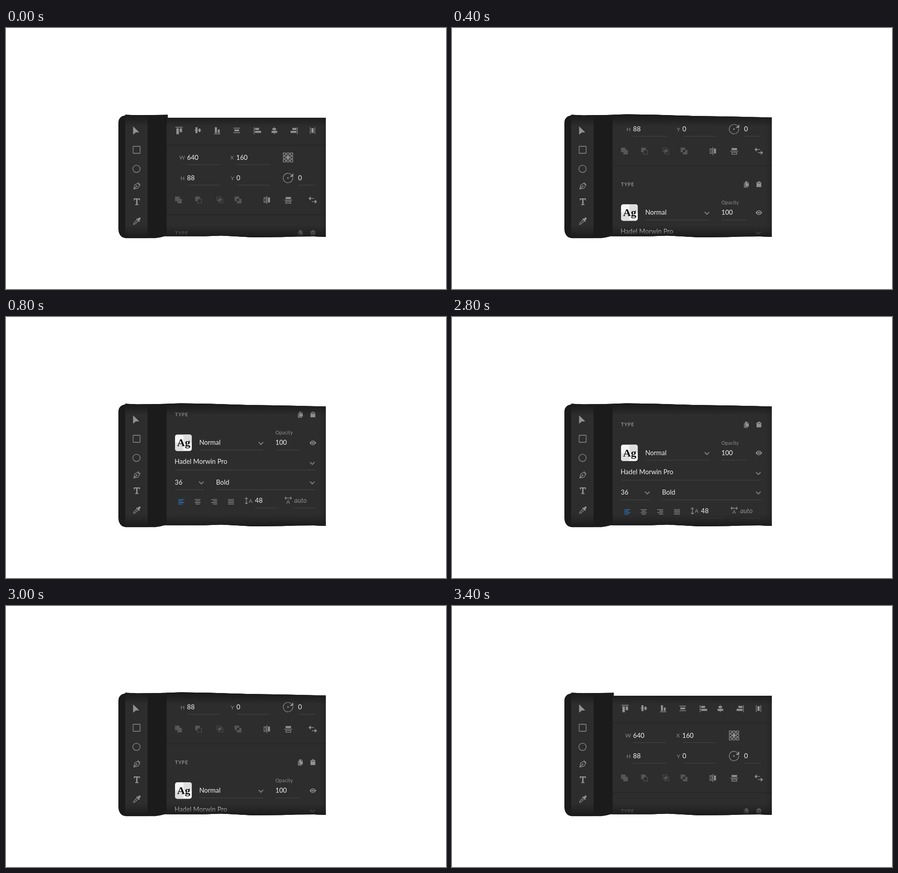
An HTML page for the animation above (5400 ms loop, 971 px wide and 576 px high).

```html
<!DOCTYPE html>
<html lang="en">
<head>
<meta charset="utf-8">
<title>Properties panel</title>
<style>
html, body { margin: 0; width: 100%; height: 100%; overflow: hidden; background: #fff; }
svg { display: block; width: 971px; height: 576px; }
text { font: 14.5px Lato, sans-serif; fill: #f0f0f0; }
.label { font-size: 12px; fill: #8c8c8c; }
.small { font-size: 11.2px; fill: #8c8c8c; }
.title { font-size: 10.6px; font-weight: bold; letter-spacing: .8px; fill: #909090; }
.serif { font: bold 24px "Liberation Serif", serif; fill: #111; }
.fill { fill: #919191; }
.line { fill: none; stroke: #919191; stroke-width: 1.3; }
.dim { fill: #565656; }
.dimline { fill: #2d2d2d; stroke: #565656; }
.rule { fill: none; stroke: #474747; }
.divider { stroke: #262626; stroke-width: 1.5; }
.chevron { fill: none; stroke: #7d7d7d; stroke-width: 2.2; }
</style>
</head>
<body>
<svg viewBox="0 0 971 576">
<defs>
  <clipPath id="shape"><path id="outline"/></clipPath>
  <clipPath id="tile"><rect x="373" y="259" width="37" height="36.5" rx="5"/></clipPath>
  <linearGradient id="fadeTop" x2="0" y2="1">
    <stop stop-color="#1b1b1b"/><stop offset=".3" stop-color="#1b1b1b" stop-opacity=".75"/>
    <stop offset="1" stop-color="#1b1b1b" stop-opacity="0"/>
  </linearGradient>
  <linearGradient id="fadeBottom" x2="0" y2="1">
    <stop stop-color="#1b1b1b" stop-opacity="0"/><stop offset=".5" stop-color="#1b1b1b" stop-opacity=".4"/>
    <stop offset="1" stop-color="#1b1b1b"/>
  </linearGradient>
  <linearGradient id="fadeRight">
    <stop stop-color="#1b1b1b" stop-opacity="0"/><stop offset="1" stop-color="#1b1b1b" stop-opacity=".4"/>
  </linearGradient>
  <path id="chevron" class="chevron" d="M-5-2.5 0 2.5 5-2.5"/>
</defs>

<g clip-path="url(#shape)">
  <path fill="#1b1b1b" d="M240 180h470v290H240z"/>
  <path fill="#2d2d2d" d="M263 185h49.500v285h-49.500zM354.500 185H706v285H354.500z"/>

  <g id="scroll">
    <path class="line" d="M374 219h16M416 225.700h15M459 233.500h14M502 221h14.500M502 231h14.500M547.500 219v15.500M592 218.500v16M643 219v15.500M671.500 219v15M681.500 219v15"/>
    <path class="fill" d="M376 221.500h5.500v13H376zM383.500 221.500h5v8.500h-5zM418 219h4.500v13H418zM425 222h4v7.500h-4zM461 219h4.500v12.500H461zM467.500 224h4v7.500h-4zM504 224h10.500v4H504zM549.500 220.500h9v4.500h-9zM549.500 227h13.500v4.500h-13.500zM588 221h8v4h-8zM586 227h12.500v4.500H586zM632 220.500h9v4.500h-9zM628 227h13v4.500h-13zM674 221h5v10.500h-5z"/>
    <path class="divider" d="M354 258.500h352M354 412h352"/>

    <text class="label" x="382.500" y="290">W</text><text x="399.500" y="290.500">640</text>
    <text class="label" x="495" y="290">X</text><text x="508" y="290.500">160</text>
    <text class="label" x="385" y="335.500">H</text><text x="399.500" y="336">88</text>
    <text class="label" x="496" y="335.500">Y</text><text x="508.500" y="336">0</text>
    <text x="644.500" y="336">0</text>
    <path class="rule" d="M400 301.500h73M509 301.500h73M400 347h73M509 347h73M645 347h37"/>

    <g id="anchors"></g>
    <path class="line" stroke-width="1.700" d="M629.500 323.500A10.500 10.500 0 1 0 632.700 330"/>
    <path class="fill" d="M634 320.500v8h-8z"/><circle class="fill" cx="622.300" cy="331" r="1.700"/>

    <path class="dim" d="M373 372h10v5h5v10h-10v-5h-5zM417.500 372h10v10h-10zM468.500 376.500h6v6h-6z"/>
    <path class="dimline" d="M422.500 377.500h9v9h-9z"/>
    <path class="dimline" style="fill:none" d="M465.500 372.500h9v9h-9zM469.500 377h9v9h-9z"/>
    <path class="dim" fill-rule="evenodd" d="M504.500 372h10v5h5v10h-10v-5h-5zM509.500 377v5h5v-5z"/>
    <path class="line" d="M569.500 374.500h4v10h-4zM575.800 371v17.500M614 379.800h17.500M617.500 382.500h11v4h-11z"/>
    <path class="fill" d="M578 374h4.500v11H578zM617 373h12v4.500h-12z"/>
    <path class="line" stroke-width="1.800" d="M670 376.200h9.500M675 383.200h9.500"/>
    <path class="fill" d="M667.500 376.200l5-4.500v9zM686.500 383.200l-5-4.500v9z"/>

    <g transform="translate(0 238)">
      <text class="title" x="373" y="218.500">TYPE</text>
      <path class="fill" d="M647 208.500h5l3 3v8h-8zM644.500 211.500h1.500v9h7v1.500h-8.500zM672 210.500h2.500v-1h1.500a1.500 1.500 0 0 1 3 0h1.500v1h2v10.500H672z"/>
      <path stroke="#2d2d2d" fill="none" d="M651.500 208.500v3.500h3.500M674.500 212.500h6"/>

      <g clip-path="url(#tile)">
        <path fill="#f6f6f6" d="M373 259h37v37h-37z"/>
        <path fill="#dedede" d="M391.500 259H410v18.300h-18.500zM373 277.300h18.500V296H373z"/>
      </g>
      <text class="serif" x="377.500" y="285">Ag</text>
      <text x="426.500" y="282">Normal</text>
      <text class="small" x="594.500" y="259">Opacity</text>
      <text x="594.500" y="282">100</text>
      <path class="fill" d="M670 277.500q7-10 14.500 0q-7.500 10-14.500 0z"/>
      <circle cx="677.200" cy="277.500" r="2.800" fill="#919191" stroke="#2d2d2d" stroke-width="1.500"/>
      <text x="372" y="324">Hadel Morwin Pro</text>
      <text x="372.500" y="369.500">36</text>
      <text x="463.500" y="369.500">Bold</text>
      <use href="#chevron" x="562.500" y="278.500"/><use href="#chevron" x="676" y="322.500"/>
      <use href="#chevron" x="431" y="365.500"/><use href="#chevron" x="676" y="365.500"/>
      <path class="rule" d="M427 293.500h141M595 293.500h55M373 337.500h310M373 381h64M464 381h219M550 421.500h50M636 421.500h47"/>

      <path class="line" style="stroke:#2f80dc" d="M380.500 402.700h13M380.500 406h9M380.500 409.300h13M380.500 412.600h9"/>
      <path class="line" d="M416.500 402.700h13M418.500 406h9M416.500 409.300h13M418.500 412.600h9M453 402.700h13M457 406h9M453 409.300h13M457 412.600h9M490 402.700h13M490 406h13M490 409.300h13M490 412.600h13"/>
      <path class="line" d="M530.500 399v13M527.500 401.500l3-3 3 3M527.500 409.500l3 3 3-3M616 399.500h13.500M618.500 396.500l-3 3 3 3M627 396.500l3 3-3 3"/>
      <text class="label" x="535.800" y="409.500">A</text><text x="549.500" y="410">48</text>
      <text class="label" x="618.500" y="411.500">A</text>
      <text x="636" y="410" style="font-style:italic;fill:#8f8f8f">auto</text>
    </g>
  </g>

  <path fill="url(#fadeTop)" d="M248 192h458v25H248z"/>
  <path fill="#1b1b1b" d="M248 185h458v7.200H248z"/>
  <path fill="url(#fadeBottom)" d="M248 435h458v26H248z"/>
  <path fill="#1b1b1b" d="M248 460.800h458v6H248z"/>
  <path fill="url(#fadeRight)" d="M692 192h14v270h-14z"/>

  <path class="fill" d="M280.500 217l13.500 13.300-7.500.3-6 4.900z"/>
  <rect class="line" x="280.500" y="261" width="15.500" height="15.500" rx="1"/>
  <circle class="line" cx="288" cy="310.800" r="8"/>
  <path class="line" d="M282 355.500l2.200-9.300 6.300-3.400 4.500 4.500-3.600 6.200zM290.800 340.600l5.600 5.600M282 355.500l5.500-5.800"/>
  <circle class="fill" cx="288.300" cy="349" r="1.500"/>
  <path class="fill" d="M282 376h13.500v4.500H294l-.7-2.300h-3v10.600l2.200.5v1.500H285v-1.500l2.200-.5v-10.600h-3l-.7 2.300H282z"/>
  <path class="line" d="M290 422.500l-7.500 7.500-1 3.500 3.500-1 7.500-7.500"/>
  <path class="fill" d="M287.500 421.500l1.500-1.500 1.700 1.500 2.300-2.500q2-1.700 3.500-.2t-.2 3.500l-2.400 2.300 1.600 1.800-1.500 1.500z"/>
</g>
</svg>
<script>
const el = id => document.getElementById(id);
const bottom = 'L705.500 461 680 460 640 460.300 610 461.300 545 462 510 460 475 458.300 440 459.500 350 459.500 340 462 330 463.500 264 463.500Q249 462 248 444V210Q248 195 263 193Z';
const restShape = 'M263 191.500 290 192.500 328 192 357 191.500V198H705.500' + bottom;
const movedShape = 'M263 191.500 290 192.800 340 192 385 190.600 450 191.500 530 194 620 195.500 705.500 197.500' + bottom;

let anchors = '<path class="line" d="M614.500 278h16v15h-16zM622.300 278v15M614.500 285.500h16"/>';
for (let i = 0; i < 9; i++) {
  const x = 611.8 + i % 3 * 8, y = 275.6 + Math.floor(i / 3) * 7.5;
  anchors += `<rect class="line" x="${x}" y="${y}" width="5" height="5" style="fill:${i === 4 ? '#919191' : '#2d2d2d'}"/>`;
}
el('anchors').innerHTML = anchors;

// Cubic ease in and out, sampled slightly after its start
function scrollAt(step) {
  if (!step) return 0;
  const u = .026 + .1145 * step;
  return 238 * (u < .5 ? 4 * u ** 3 : 1 - 4 * (1 - u) ** 3);
}

function draw() {
  const tick = Math.floor(performance.now() % 5400 / 100);
  const step = tick < 28 ? Math.min(tick, 8) : Math.max(34 - tick, 0);
  el('scroll').setAttribute('transform', `translate(0 ${-scrollAt(step)})`);
  el('outline').setAttribute('d', step ? movedShape : restShape);
  requestAnimationFrame(draw);
}
draw();
</script>
</body>
</html>
```
